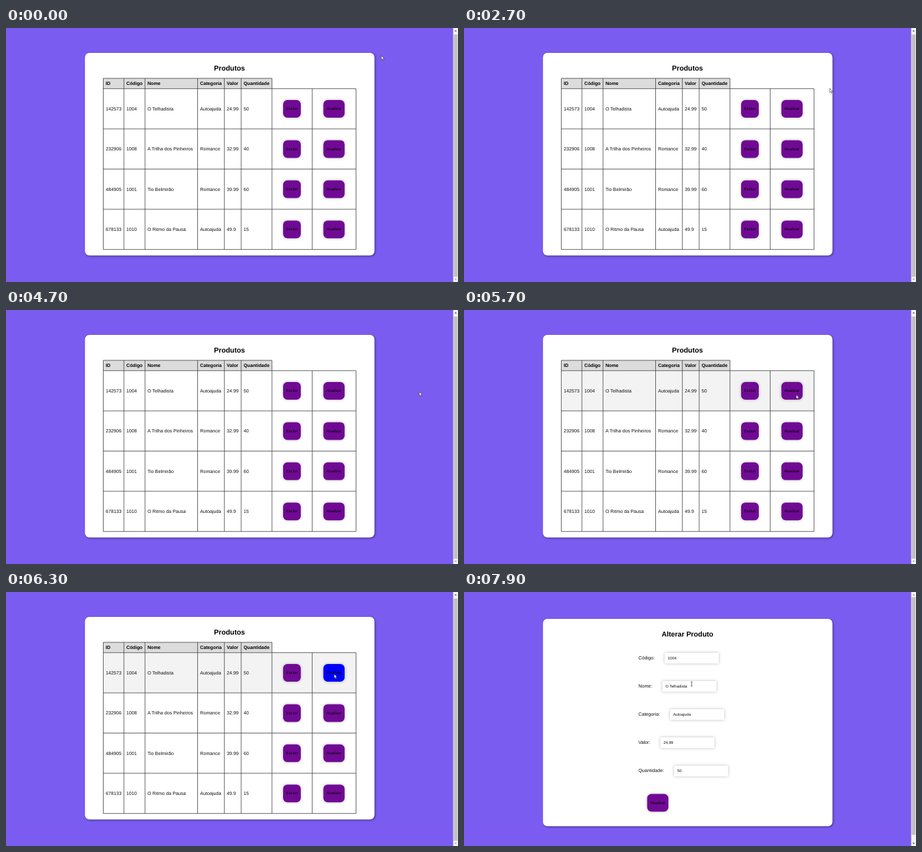
Recreate the animation shown at these times as an HTML page. Size 690x388 px, loop 8000 ms.

```html
<!DOCTYPE html>
<html lang="pt-BR">
<head>
<meta charset="utf-8">
<title>Produtos</title>
<style>
  html, body { margin: 0; width: 100%; height: 100%; overflow: hidden; background: #7b5cf0; }
  svg { display: block; width: 690px; height: 388px; }
  text { font: 7.19px Arial, "Liberation Sans", sans-serif; fill: #111; text-rendering: geometricPrecision; }
  .head { font-weight: bold; fill: #000; }
  .title { font-weight: bold; font-size: 10.78px; text-anchor: middle; fill: #000; }
  .small { font-size: 5.99px; }
  .label { font-size: 5.99px; text-anchor: middle; fill: #000; }
  .panel { fill: #fff; filter: drop-shadow(1.3px 1.3px 1.6px rgba(0, 0, 0, .5)); }
  .button { fill: #700a94; filter: drop-shadow(0 0 2.3px rgba(0, 0, 0, .28)); }
  .field { fill: #fff; filter: drop-shadow(0 0 2.2px rgba(0, 0, 0, .27)); }
  .grid { fill: none; stroke: #3c3c42; stroke-width: .8; }
</style>
</head>
<body>
<svg id="stage" viewBox="0 0 690 388"></svg>
<script>
const LOOP = 8000;
const stage = document.getElementById('stage');

function add(parent, tag, attrs = {}, content = '') {
  const node = document.createElementNS('http://www.w3.org/2000/svg', tag);
  for (const key in attrs) node.setAttribute(key, attrs[key]);
  node.textContent = content;
  parent.appendChild(node);
  return node;
}
const box = (parent, x, y, width, height, attrs) =>
  add(parent, 'rect', { x, y, width, height, ...attrs });
const write = (parent, x, y, content, cls = '') =>
  add(parent, 'text', { x, y, class: cls }, content);

function button(parent, x, y, width, name) {
  const face = box(parent, x, y, width, 27, { rx: 6.5, class: 'button' });
  write(parent, x + width / 2, y + 15.2, name, 'label');
  return face;
}

function scrollbar(parent, top, bottom, upColor, downColor) {
  box(parent, 682.6, 0, 7.4, 388, { fill: '#f1f1f1' });
  box(parent, 683.4, top, 5.9, bottom - top, { fill: '#c1c1c1' });
  add(parent, 'path', { d: 'M684.6 5.2h3.6l-1.8-2z', fill: upColor });
  add(parent, 'path', { d: 'M684.6 383h3.6l-1.8 2z', fill: downColor });
}

function buildList() {
  const page = add(stage, 'g');
  const columns = [148.5, 180, 212.2, 292.5, 333.3, 359, 406];
  const heads = ['ID', 'Código', 'Nome', 'Categoria', 'Valor', 'Quantidade'];
  const rows = [
    ['142573', '1004', 'O Telhadista', 'Autoajuda', '24.99', '50'],
    ['232906', '1008', 'A Trilha dos Pinheiros', 'Romance', '32.99', '40'],
    ['484905', '1001', 'Tio Belmirão', 'Romance', '39.99', '60'],
    ['678133', '1010', 'O Ritmo da Pausa', 'Autoajuda', '49.9', '15']
  ];
  const top = 92.7, pitch = 61.4, bottom = top + 4 * pitch, right = 534.3;

  box(page, 120.5, 38, 442, 309.5, { rx: 6.7, class: 'panel' });
  write(page, 341.2, 65, 'Produtos', 'title');
  box(page, 148.5, 76.9, 257.5, 15.8, { fill: '#dcdcdc' });
  const hoverRow = box(page, 148.5, top, right - 148.5, pitch, { fill: '#f3f3f3' });

  let lines = 'M148.5 76.9H406';
  columns.forEach(x => lines += `M${x} 76.9V${bottom}`);
  [467.4, right].forEach(x => lines += `M${x} ${top}V${bottom}`);
  for (let i = 0; i < 5; i++) lines += `M148.5 ${top + i * pitch}H${right}`;
  add(page, 'path', { d: lines, class: 'grid' });

  heads.forEach((name, i) => write(page, columns[i] + 3.7, 87.1, name, 'head'));
  const updates = rows.map((cells, r) => {
    const y = top + r * pitch;
    cells.forEach((cell, i) => write(page, columns[i] + 3.7, y + 33, cell));
    button(page, 423, y + 17.3, 27, 'Excluir');
    return button(page, 484.5, y + 17.3, 32.4, 'Atualizar');
  });
  scrollbar(page, 10, 380, '#505050', '#a3a3a3');
  return { page, hoverRow, update: updates[0] };
}

function buildForm() {
  const page = add(stage, 'g');
  const fields = [
    ['Código:', 306.3, '1004'],
    ['Nome:', 302.8, 'O Telhadista'],
    ['Categoria:', 314.6, 'Autoajuda'],
    ['Valor:', 299.7, '24,99'],
    ['Quantidade:', 320.7, '50']
  ];
  box(page, 120.5, 41, 442, 316.7, { rx: 6.7, class: 'panel' });
  write(page, 341.2, 67.8, 'Alterar Produto', 'title');
  fields.forEach(([name, x, value], i) => {
    const y = 100.9 + i * 43.1;
    write(page, 266.2, y + 2, name);
    box(page, x, y - 8.1, 82.6, 16.4, { class: 'field' });
    write(page, x + 4.7, y + 2, value, 'small');
  });
  button(page, 279.6, 308.5, 32.4, 'Atualizar');
  scrollbar(page, 8, 371, '#a3a3a3', '#505050');
  return page;
}

const list = buildList();
const form = buildForm();
const arrow = add(stage, 'path', {
  d: 'M0 0V6.2L1.4 5L2.4 7.3L3.4 6.8L2.4 4.6H4.3Z',
  fill: '#fff', stroke: '#222', 'stroke-width': .55
});
const beam = add(stage, 'path', {
  d: 'M-1.4-3.3H-.4L0-3L.4-3.3H1.4M0-3V3M-1.4 3.3H-.4L0 3L.4 3.3H1.4',
  fill: 'none', stroke: '#333', 'stroke-width': .7
});

// time, x, y of the pointer; each place holds until the next
const moves = [
  [0, 573, 42.3], [400, 590, 51], [500, 608.4, 60.3], [700, 611, 70.7],
  [2700, 558.3, 92.2], [3000, 540, 104], [3100, 516, 118], [3200, 499, 124.4],
  [3700, 499.2, 125], [4700, 631, 125], [5700, 507.2, 129.5], [5800, 505, 128.3],
  [6000, 503, 127], [6100, 501.6, 126], [6200, 501, 125.4], [6500, 501, 125.8],
  [7400, 355.6, 111.6], [7900, 347.6, 140.4]
];
const fills = [[0, '#700a94'], [5800, '#4b07b8'], [6000, '#0000f8']];
const at = (steps, t) => steps.filter(s => s[0] <= t).pop();
const show = (node, on) => node.setAttribute('visibility', on ? 'visible' : 'hidden');

function draw(t) {
  const [, x, y] = at(moves, t);
  show(list.page, t < 6500);
  show(form, t >= 6500);
  show(list.hoverRow, t >= 5700 && t < 6500);
  list.update.style.fill = at(fills, t)[1];
  show(arrow, t < 7400);
  show(beam, t >= 7400);
  for (const pointer of [arrow, beam]) pointer.setAttribute('transform', `translate(${x} ${y})`);
}

function tick() {
  draw(performance.now() % LOOP);
  requestAnimationFrame(tick);
}
tick();
</script>
</body>
</html>
```
